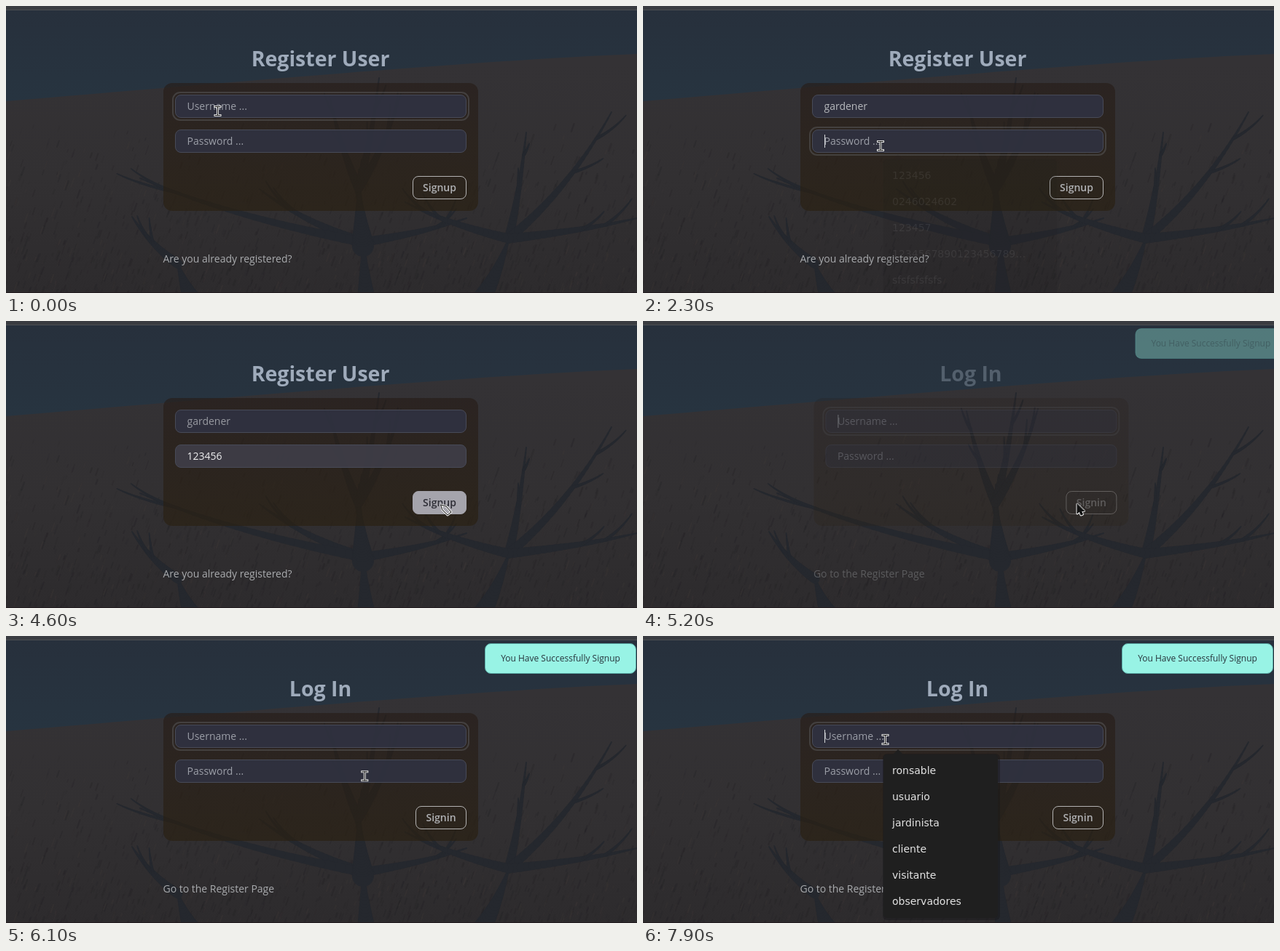
Animation of 866 by 395 pixels, one loop 8 s. Source, as an HTML page with a canvas:

```html
<!DOCTYPE html>
<html lang="en">
<head>
<meta charset="utf-8">
<title>Register and log in</title>
<style>
  html, body { margin: 0; width: 100%; height: 100%; overflow: hidden; background: #2d2b2d; }
  canvas { display: block; }
</style>
</head>
<body>
<canvas id="stage" width="866" height="395"></canvas>
<script>
const W = 866, H = 395, LOOP = 8000, STEP = 100;
const ctx = document.getElementById('stage').getContext('2d');
const SANS = '"Open Sans", "Noto Sans", sans-serif';
const BODY = `500 14px ${SANS}`, BUTTON = `600 14px ${SANS}`, TITLE = `700 28.5px ${SANS}`;
const MENU = '14px "DejaVu Sans", sans-serif';
const PREVIEW = '13.333px "Liberation Sans", Arial, sans-serif';

const USER = 'gardener';
const PASSWORDS = ['123456', '0246024602', '123457', '1234567890123456789…', 'sfsfsfsfsfs'];
const USERS = ['ronsable', 'usuario', 'jardinista', 'cliente', 'visitante', 'observadores'];

const clamp = v => Math.min(1, Math.max(0, v));
const progress = (t, from, to) => clamp((t - from) / (to - from));
const mix = (a, b, p) => a + (b - a) * p;
const within = (t, from, to) => t >= from && t < to;

function box(x, y, w, h, r, fill, stroke, line = 1) {
  ctx.beginPath();
  ctx.roundRect(x, y, w, h, r);
  if (fill) { ctx.fillStyle = fill; ctx.fill(); }
  if (stroke) { ctx.strokeStyle = stroke; ctx.lineWidth = line; ctx.stroke(); }
}

function text(str, x, y, font, color, align = 'left') {
  ctx.font = font;
  ctx.fillStyle = color;
  ctx.textAlign = align;
  ctx.fillText(str, x, y);
}

function faded(alpha, draw) {
  if (alpha <= 0) return;
  ctx.save();
  ctx.globalAlpha *= alpha;
  draw();
  ctx.restore();
}

function gradient(c, y1, y2, ...stops) {
  const g = c.createLinearGradient(0, y1, 0, y2);
  stops.forEach((color, i) => g.addColorStop(i / (stops.length - 1), color));
  return g;
}

// ---- Landscape, painted once ----
function paintLandscape() {
  const canvas = document.createElement('canvas');
  canvas.width = W;
  canvas.height = H;
  const c = canvas.getContext('2d');
  let seed = 7;
  const random = () => (seed = (seed * 16807) % 2147483647) / 2147483647;
  const stroke = (x1, y1, x2, y2, width, color) => {
    c.lineWidth = width;
    c.strokeStyle = color;
    c.beginPath();
    c.moveTo(x1, y1);
    c.lineTo(x2, y2);
    c.stroke();
  };
  c.lineCap = 'round';

  c.fillStyle = gradient(c, 0, 130, '#27303c', '#273440');
  c.fillRect(0, 0, W, H);

  c.beginPath();
  c.moveTo(0, 131);
  c.bezierCurveTo(290, 107, 640, 75, W, 66);
  c.lineTo(W, H);
  c.lineTo(0, H);
  c.fillStyle = gradient(c, 80, H, '#343235', '#323032', '#2d2b2d');
  c.fill();

  for (let i = 0; i < 1500; i++) {
    const x = random() * W, y = 150 + Math.sqrt(random()) * 250, len = 3 + random() * 9;
    const color = random() < .7 ? `rgba(34,32,36,${random() * .35})` : `rgba(70,62,58,${random() * .25})`;
    stroke(x, y, x - len * .35, y + len, 1 + random() * 1.5, color);
  }

  // A limb leaves its fork sideways, then rises towards the tip, tapering.
  const limb = ([x1, y1], [x2, y2], width, twigs) => {
    const cx = mix(x1, x2, .6), cy = mix(y1, y2, .4);
    const at = k => [mix(mix(x1, cx, k), mix(cx, x2, k), k), mix(mix(y1, cy, k), mix(cy, y2, k), k)];
    for (let k = 0; k < 1; k += .04) stroke(...at(k), ...at(k + .04), mix(width, 1.5, k), '#25282e');
    for (let i = 0; i < twigs; i++) {
      const [x, y] = at(.4 + random() * .45);
      limb([x, y], [x + (x2 - x1) * .22 + random() * 24 - 12, y - 15 - random() * 25], width * .35, 0);
    }
  };
  const tree = (root, fork, ...tips) => {
    limb(root, fork, 30, 0);
    for (const tip of tips) limb(fork, tip, 13, 2);
  };
  tree([262, 415], [236, 355], [173, 290]);
  tree([496, 420], [490, 325], [348, 252], [184, 237], [632, 292], [484, 225]);
  tree([490, 330], [484, 250], [444, 124], [512, 99], [542, 121]);
  tree([645, 415], [690, 320], [714, 174], [831, 146], [866, 292], [548, 270]);

  c.fillStyle = '#3a3c41';
  c.fillRect(0, 0, W, 5);
  c.fillStyle = '#4b4d51';
  c.fillRect(0, 5, W, 1);
  c.fillStyle = '#241d21';
  c.fillRect(0, H - 1, W, 1);
  return canvas;
}
const landscape = paintLandscape();

// ---- Form pages ----
function field(y, { value, placeholder, focused, caret, font = BODY, color, filled }) {
  box(232.5, y + .5, 399, 31, 7.5, filled ? 'rgba(62,61,71,.94)' : 'rgba(48,51,67,.86)', '#474a57');
  if (focused) box(229, y - 3, 406, 38, 10, null, 'rgba(166,173,187,.2)', 2);
  text(value || placeholder, 248.5, y + 21, font, value ? color : '#9b9ea7');
  if (caret) {
    ctx.fillStyle = '#d5d7da';
    ctx.fillRect(caret, y + 7, 1, 18);
  }
}

function page(title, link, button, buttonX, hover, user, password) {
  text(title, 431.5, 83, TITLE, '#9fabbb', 'center');
  box(216, 106, 432, 176, 12, gradient(ctx, 106, 282, 'rgba(38,28,23,.64)', 'rgba(41,31,16,.64)'));
  field(122, { placeholder: 'Username ...', ...user });
  field(170, { placeholder: 'Password ...', ...password });
  box(buttonX + .5, 234.5, 631 - buttonX, 31, 7.5, hover && '#a5a4ac', hover ? '#a5a4ac' : '#b3b2b2');
  text(button, (buttonX + 632) / 2, 255, BUTTON, hover ? '#2c2c34' : '#b0b1b4', 'center');
  text(link, 215.5, 353, BODY, '#a9abae');
}

function registerPage(t) {
  const user = { focused: t < 2300, color: t < 2500 ? '#b6b8bc' : '#989aa1' };
  if (within(t, 500, 700)) user.caret = 249;
  if (t >= 700) user.value = USER;
  if (within(t, 700, 1300) || within(t, 1800, 2300)) {
    ctx.font = BODY;
    user.caret = Math.round(249 + ctx.measureText(USER).width);
  }
  const password = { focused: within(t, 2300, 4500), color: '#f0f0f1' };
  if (t >= 3300) Object.assign(password, { value: PASSWORDS[0], filled: true });
  if (within(t, 3300, 3500)) password.font = PREVIEW;
  if (within(t, 2300, 3500)) password.caret = 249;
  if (within(t, 3500, 4000)) password.caret = 298;
  page('Register User', 'Are you already registered?', 'Signup', 558, t >= 4200, user, password);
}

function loginPage(t) {
  const caretOn = t >= 7400 || (t - 5400) % 1000 < 500;
  page('Log In', 'Go to the Register Page', 'Signin', 562, false,
    { focused: true, caret: caretOn && 249 }, {});
  box(657.5, 10.5, 207, 41, 8, '#98f3e5', '#5aa9a4');
  text('You Have Successfully Signup', 761, 35, `500 12px ${SANS}`, '#27343b', 'center');
}

// ---- Browser overlays ----
function menu(top, width, height, items, selected) {
  box(329, top - 1, width + 4, height + 4, 6, 'rgba(24,24,25,.45)');
  box(330, top, width, height, 5, '#1f1f1f');
  ctx.beginPath();
  ctx.moveTo(343, top);
  ctx.lineTo(350, top - 7);
  ctx.lineTo(357, top);
  ctx.fill();
  if (selected) {
    box(334, top + 4, width - 8, 36, 4, '#363636');
    ctx.strokeStyle = '#e4e4e4';
    ctx.lineWidth = 1.5;
    ctx.beginPath();
    for (const d of [-4, 4]) {
      ctx.moveTo(546 - d, top + 18);
      ctx.lineTo(546 + d, top + 26);
    }
    ctx.stroke();
  }
  items.forEach((item, i) => text(item, 342, top + 27 + i * 36, MENU, '#e3e3e3'));
}

function tooltip() {
  box(343, 157, 157, 25, 0, '#727272');
  text('Completa este campo', 421.5, 174, '13.333px "DejaVu Sans", sans-serif', '#111', 'center');
}

// ---- Pointer ----
const MOVES = [
  { from: 1500, to: 2000, x: 326, y: 192.5 },
  { from: 3200, to: 3300, x: 381, y: 234 },
  { from: 3600, to: 4300, x: 596, y: 252 },
  { from: 5800, to: 6500, x: 354, y: 114 },
  { from: 6500, to: 6700, x: 332.5, y: 142.5 }
];
const SHAPES = {
  arrow: new Path2D('M0 0V13L3 10L5 15L7.5 14L5.5 9.5H9.5Z'),
  beam: new Path2D('M-3.5 -6H3.5M0 -6V6M-3.5 6H3.5'),
  hand: new Path2D('M1 1L8 3L15 11L10 15L3 8Z')
};

function pointer(t) {
  if (within(t, 800, 1600)) return;
  let x = 290.5, y = 144.5;
  for (const move of MOVES) {
    const p = progress(t, move.from, move.to);
    x = mix(x, move.x, p);
    y = mix(y, move.y, p);
  }
  const overField = within(y, 122, 154) || within(y, 170, 202);
  const shape = within(t, 4200, 5100) ? 'hand' : overField ? 'beam' : 'arrow';
  ctx.save();
  ctx.translate(x, y);
  ctx.lineJoin = 'round';
  ctx.lineCap = 'square';
  for (const [width, color] of [[3, '#e8e8e8'], [1, '#111']]) {
    ctx.lineWidth = width;
    ctx.strokeStyle = ctx.fillStyle = color;
    ctx.stroke(SHAPES[shape]);
    if (shape === 'arrow') ctx.fill(SHAPES[shape]);
  }
  ctx.restore();
}

function render(t) {
  ctx.drawImage(landscape, 0, 0);
  ctx.save();
  if (t < 5100) {
    const leave = progress(t, 4600, 5100);
    ctx.translate(-26 * leave, 0);
    faded(1 - leave, () => registerPage(t));
  } else {
    const enter = progress(t, 5100, 5900);
    ctx.translate(21 * (1 - enter), 0);
    faded(1 - (1 - enter) ** 3.5, () => loginPage(t));
  }
  ctx.restore();

  const passwordMenu = t < 3500 ? progress(t, 2270, 2600) : 1 - progress(t, 3400, 3700);
  faded(passwordMenu, () => menu(211, 238, 190, PASSWORDS, t >= 3300));
  faded(t < 7500 ? progress(t, 7120, 7400) : 1 - progress(t, 7400, 7700), tooltip);
  faded(progress(t, 7570, 7900), () => menu(163, 157, 225, USERS));
  pointer(t);
}

const start = performance.now();
function tick() {
  const t = (performance.now() - start) % LOOP;
  render(Math.floor(t / STEP) * STEP);
  requestAnimationFrame(tick);
}
tick();
</script>
</body>
</html>
```
